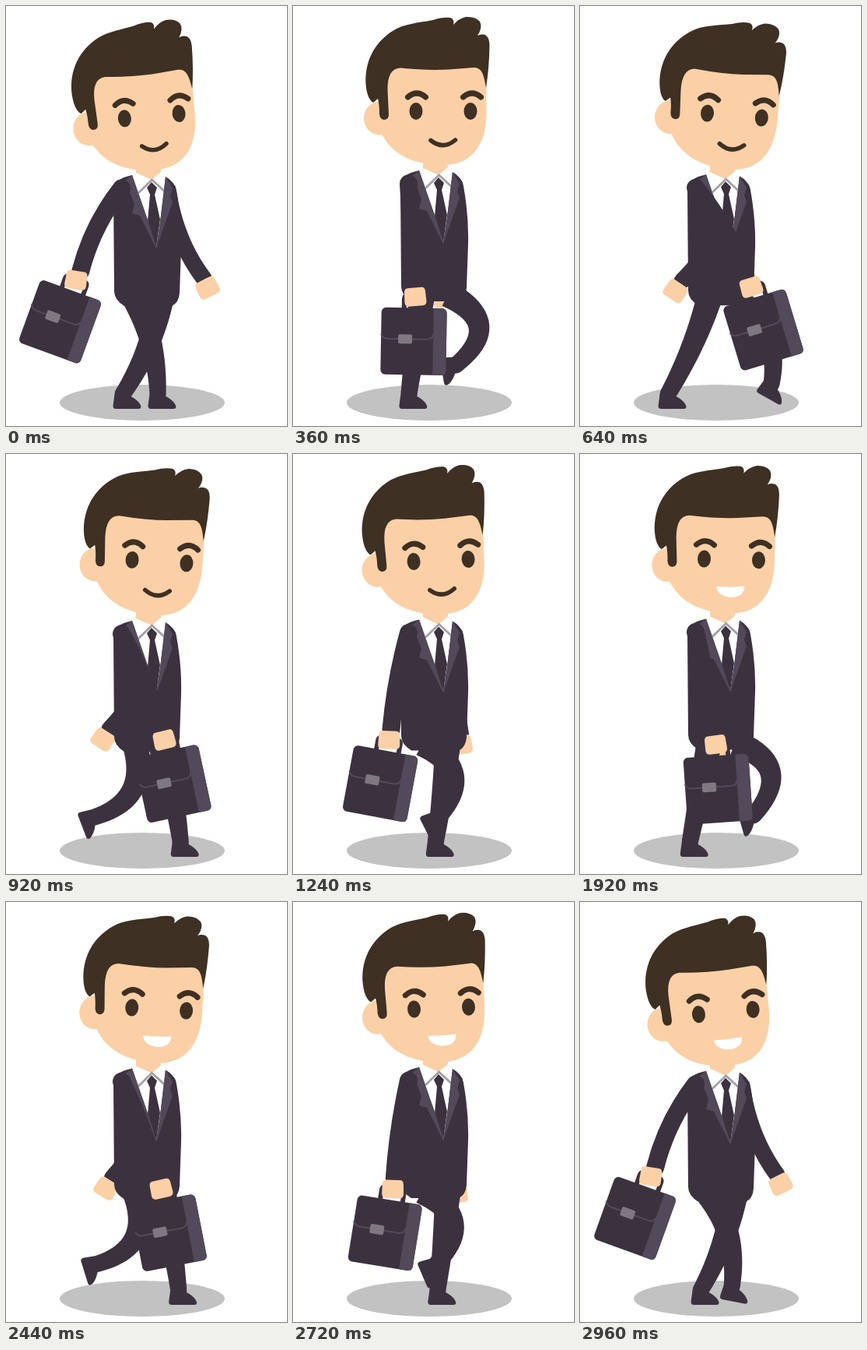
An HTML page that plays this animation: 361 by 539 pixels, repeating every 3 s.

```html
<!DOCTYPE html>
<html lang="en">
<head>
<meta charset="utf-8">
<title>Walking businessman</title>
<style>
  html, body { margin: 0; width: 100%; height: 100%; overflow: hidden; background: #fff; }
  svg { display: block; width: 100vw; height: 100vh; }
  .suit { fill: #3c323f; }
  .trim { fill: #52495b; }
  .skin { fill: #fcd0a6; }
  .hair { fill: #3e3023; }
  .limb { fill: none; stroke: #3c323f; stroke-linecap: round; }
  .line { fill: none; stroke: #3e3023; stroke-linecap: round; }
</style>
</head>
<body>
<svg viewBox="0 0 361 539">
  <defs>
    <path id="shoe" class="suit" d="M-10.500 0L-12.500 15Q-12.500 19 -9 19H20Q24.500 19 23 14.500Q20 8 10.500 3V0A10.500 10.500 0 0 0 -10.500 0Z"/>
    <path id="palm" class="skin" d="M-9 -12H9Q13 -12 13.500 -7L14 6Q14 11 9 11.500H-9Q-14 11 -14 6L-13.500 -7Q-13 -12 -9 -12Z"/>
    <path id="brow" class="line" stroke-width="7" d="M-11.500 4Q0 -6 11.500 4"/>
  </defs>
  <ellipse cx="175" cy="509" rx="106" ry="23" fill="#c2c2c2"/>

  <path id="farArm" class="limb" stroke-width="21"/>
  <use id="farHand" href="#palm"/>

  <path id="legB" class="suit"/>
  <use id="footB" href="#shoe"/>
  <path id="legA" class="suit"/>
  <use id="footA" href="#shoe"/>

  <g id="torso">
    <path class="suit" d="M162 211L205 213Q216 219 219 231Q226 270 225 305L223 362Q222 375 213 379H152Q139 371 139 360L138 230Q138 216 162 211Z"/>
    <path fill="#fff" d="M162 211L168 205L187 216L199 205L205 213L198 272L193 304L183 272Z"/>
    <path class="skin" d="M167 193H199V207L187 217L167 208Z"/>
    <path class="suit" d="M181 227L187 220L194 227L191 236L198 268L193 304L182 270L185 236Z"/>
    <path fill="none" stroke="#a3a1a6" stroke-width="2.800" d="M170 234L187.500 217L206 234"/>
    <path class="trim" d="M162 211L153 218L165 248L162 260L172 263L193 305L183 271Z"/>
    <path class="trim" d="M205 213L214 228L211 238L214 246L193 305L198 271Z"/>
  </g>
  <path id="arm" class="limb" stroke-width="23"/>

  <g id="bag">
    <rect x="-14" y="-2" width="29" height="20" rx="4" class="limb" stroke-width="6"/>
    <rect x="-43" y="14" width="84" height="86" rx="6" class="suit"/>
    <path class="trim" d="M24 14H34Q41 14 41 22V94Q41 100 35 100H24Z"/>
    <path fill="none" stroke="#52495b" stroke-width="2" d="M-43 48Q-41 54 -35 54H15Q24 54 24 47"/>
    <rect x="-21" y="48" width="18" height="12" rx="2" fill="#7d7882"/>
  </g>
  <use id="hand" href="#palm"/>

  <g id="head">
    <ellipse class="skin" cx="111" cy="144" rx="20" ry="21.500"/>
    <path class="skin" d="M112 95Q112 70 140 70L238 66Q248 66 248.500 105V138C248 180 228 203 196 204C152 205 124 188 112 160Z"/>
    <path class="hair" d="M248 105Q252 80 252.500 50Q252 37 244 36.500Q240 36 237 38Q244 27 240 20Q234 13 222 14Q213 16 206 24Q208 17 202 15Q192 14 180 18C158 22 142 23 128 32C103 48 92 73 93.500 100Q95 119 103 124L109 119Q111 126 111 139Q112 146 117 146Q123 146 123 139L121.500 108Q121 80 138 79.500Q172 83 200 81.500L232 79C242 79 245 86 248 105Z"/>
    <use href="#brow" x="159" y="113"/>
    <use href="#brow" x="230" y="113"/>
    <ellipse class="hair" cx="158" cy="135" rx="8.500" ry="11"/>
    <ellipse class="hair" cx="228" cy="135" rx="8.500" ry="11"/>
    <path id="smile" class="line" stroke-width="5.500" d="M177 172.500Q193 185 208.500 172"/>
    <path id="grin" fill="#fff" d="M174.500 170Q193 171 210.500 169Q211 183 193 183.500Q176 182 174.500 170Z"/>
  </g>
</svg>
<script>
const LOOP = 3000, STEP = 1500, FRAME = 40;
const GROUND = 498, STRIDE = 48;
const { sin, cos, PI, hypot, floor } = Math;
const el = {};
document.querySelectorAll('[id]').forEach(n => el[n.id] = n);

// Cosine swing whose far end is reached at the turning time
const swing = (t, turn) =>
  cos(PI * (t < turn ? t / turn : 1 + (t - turn) / (STEP - turn)));

const put = (node, x, y, r = 0) =>
  node.setAttribute('transform', `translate(${x} ${y}) rotate(${r})`);

// Quadratic curve drawn as a solid that narrows from w0 to w1
function taper(node, x0, y0, kx, ky, x1, y1, w0, w1) {
  const left = [], right = [], n = 20;
  for (let i = 0; i <= n; i++) {
    const s = i / n, r = 1 - s;
    const x = r * r * x0 + 2 * r * s * kx + s * s * x1;
    const y = r * r * y0 + 2 * r * s * ky + s * s * y1;
    const dx = r * (kx - x0) + s * (x1 - kx), dy = r * (ky - y0) + s * (y1 - ky);
    const h = (w0 * r + w1 * s) / 2 / hypot(dx, dy);
    left.push([x + dy * h, y - dx * h]);
    right.unshift([x - dy * h, y + dx * h]);
  }
  node.setAttribute('d', 'M' + left.concat(right).join('L') + 'Z');
}

// Half a step on the ground moving back, half a step in the air
function drawLeg(name, hipX, hipY, midX, t) {
  const p = (t % STEP) / STEP * 2, air = p >= 1, q = p % 1;
  const arc = sin(PI * q);
  let x = midX + STRIDE * (1 - 2 * q), y = GROUND, turn = 0, knee = 14 - 14 * arc;
  if (air) {
    const lift = sin(PI * q ** .77);
    x = midX - STRIDE * cos(PI * q) + 30 * q * arc * arc;
    y -= 38 * lift;
    turn = 82 * lift;
    knee = 14 + 56 * arc;
  }
  const dx = x - hipX, dy = y - hipY, k = knee / hypot(dx, dy);
  taper(el['leg' + name], hipX, hipY,
    (hipX + x) / 2 + dy * k, (hipY + y) / 2 - dx * k, x, y, 33, 21);
  put(el['foot' + name], x, y, turn);
}

function drawArm(node, x, y, hx, hy, bx, by) {
  const ex = x + (hx - x) * .9, ey = y + (hy - y) * .9;
  node.setAttribute('d',
    `M${x} ${y}Q${(x + ex) / 2 + bx} ${(y + ey) / 2 + by} ${ex} ${ey}`);
}

function draw(time) {
  const t = time % STEP;
  const c = swing(t, 720), f = swing(t, 780);
  const bob = 6 * c * c;

  put(el.torso, 0, bob);
  el.head.setAttribute('transform', `translate(0 ${bob}) rotate(${-5.2 * c} 192 199)`);

  // Near arm with the briefcase
  const hx = 157 - 67 * c, hy = 373.5 - 18 * c * c - 3.5 * c;
  const tilt = 1 + 19 * c;
  drawArm(el.arm, 148.5, 228 + bob, hx, hy, -11 * c, -6 * c * c);
  put(el.bag, hx, hy, tilt);
  put(el.hand, hx, hy, tilt * .7 - 5);

  // Far arm
  const fx = 185 + 74 * f, fy = 376 - 14 * f * f;
  drawArm(el.farArm, 208, 230 + bob, fx, fy, -13 * f, 9);
  put(el.farHand, fx, fy, 6 - 33 * f);

  drawLeg('A', 166, 370 + bob, 147, t);
  drawLeg('B', 199, 370 + bob, 198, t + STEP / 2);

  const open = time >= STEP;
  el.smile.style.display = open ? 'none' : '';
  el.grin.style.display = open ? '' : 'none';
}

const start = performance.now();
function tick() {
  const time = (performance.now() - start) % LOOP;
  draw(floor(time / FRAME) * FRAME);
  requestAnimationFrame(tick);
}
tick();
</script>
</body>
</html>
```
